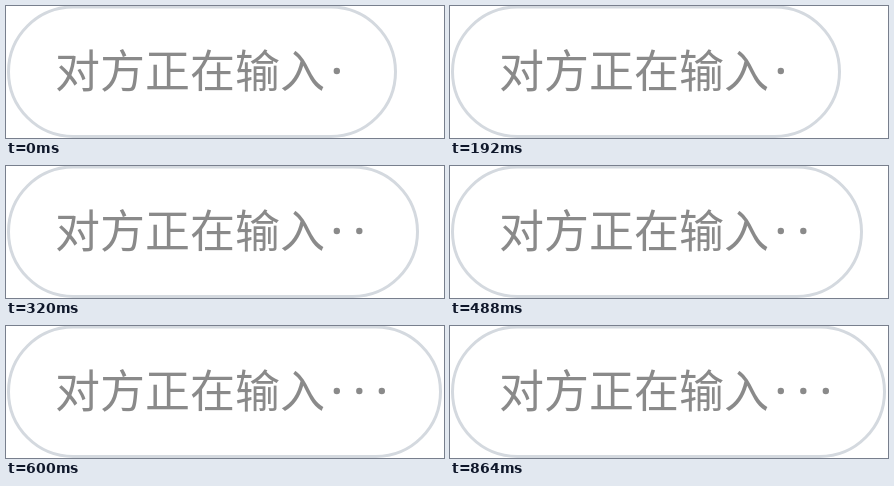
An HTML page that plays this animation: 438 px wide and 132 px high, repeating every 1.04 s.

```html
<!DOCTYPE html>
<html lang="zh-CN">
<head>
<meta charset="utf-8">
<style>
  html, body { margin: 0; width: 100%; height: 100%; overflow: hidden; background: #fff; }
  svg { display: block; }
  #bubble { fill: #fff; stroke: #d4d9df; stroke-width: 3; }
  text { font: 400 45px "Noto Sans CJK SC", "Noto Sans CJK", sans-serif; }
  text, circle { fill: #8a8a8a; }
</style>
</head>
<body>
<svg width="438" height="132" viewBox="0 0 438 132">
  <rect id="bubble" x="2.5" y="1" height="129.5" rx="64.75"/>
  <text x="49" y="82.3">对方正在输入</text>
  <circle cx="330.8" cy="65" r="3.2"/>
  <circle cx="353.3" cy="65" r="3.2"/>
  <circle cx="375.8" cy="65" r="3.2"/>
</svg>
<script>
  const LOOP = 1040;
  const DOT_STEP = 22.5;
  const bubble = document.getElementById('bubble');
  const dots = document.querySelectorAll('circle');
  const start = performance.now();

  function draw() {
    const t = (performance.now() - start) % LOOP;
    const count = t < 320 ? 1 : t < 600 ? 2 : 3;
    bubble.setAttribute('width', Math.floor(364.5 + DOT_STEP * count));
    dots.forEach((dot, i) => dot.setAttribute('visibility', i < count ? 'visible' : 'hidden'));
    requestAnimationFrame(draw);
  }
  draw();
</script>
</body>
</html>
```
